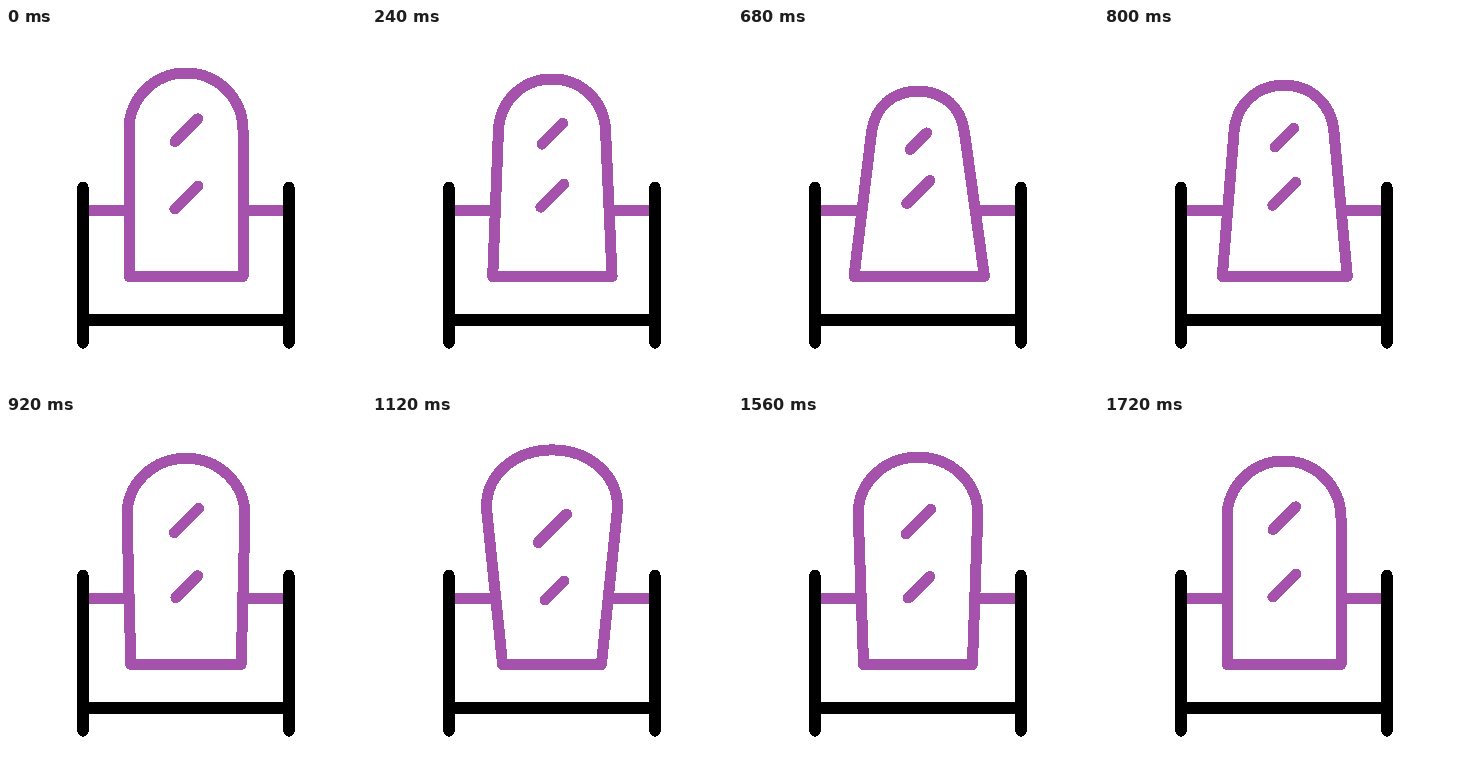
Write an HTML page that moves like this. It is 360x360 px and loops after 2000 ms.

```html
<!DOCTYPE html>
<html>
<head>
<meta charset="utf-8">
<style>
  html, body { margin: 0; width: 100%; height: 100%; overflow: hidden; background: #fff; }
  svg { display: block; width: 100vw; height: 100vh; shape-rendering: crispEdges; }
  path { fill: none; stroke-width: 11; stroke-linecap: round; stroke-linejoin: round; }
  .glass { stroke: #a452ac; }
  .stand { stroke: #000; stroke-width: 11.4; }
</style>
</head>
<body>
<svg viewBox="0 0 360 360">
  <path class="glass" d="M77 182.5H122M238 182.5H283"/>
  <path class="glass" id="mirror"/>
  <path class="stand" d="M77 159.5V315M283 159.5V315M77 292H283"/>
</svg>
<script>
const LOOP = 2000, STEP = 40, CENTER = 180, BASE = 248.5;

// tilt: 0 upright, 1 leaning forward, -1 leaning back
const moves = [
  { start: 120, end: 680, from: 0, to: 1, ease: [.25, .1, .25, 1] },
  { start: 680, end: 1240, from: 1, to: -1, ease: [.36, 0, .3, 1] },
  { start: 1240, end: 1720, from: -1, to: 0, ease: [.6, 0, .6, 1] },
];

const curve = (a, b, s) => 3 * a * s * (1 - s) ** 2 + 3 * b * s * s * (1 - s) + s ** 3;

function bezierEase([x1, y1, x2, y2], t) {
  let low = 0, high = 1;
  for (let i = 0; i < 24; i++) {
    const mid = (low + high) / 2;
    if (curve(x1, x2, mid) < t) low = mid; else high = mid;
  }
  return curve(y1, y2, low);
}

function tiltAt(time) {
  const move = moves.find(m => time >= m.start && time < m.end);
  if (!move) return 0;
  const { start, end, from, to, ease } = move;
  return from + (to - from) * bezierEase(ease, (time - start) / (end - start));
}

function frame(tilt) {
  const forward = Math.max(tilt, 0), back = Math.max(-tilt, 0);
  const foot = 57 + 8.2 * tilt;
  const shoulder = 57 - 10.5 * forward + 8.7 * back;
  const shoulderY = 102 + 2.5 * forward - 5.5 * back;
  const top = 45 + 18.3 * forward - 12 * back;
  const shift = 1.2 * forward;

  // The arch leaves each side along that side's own direction.
  const bend = .215 - .04 * tilt;
  const handle = shoulder + (shoulder - foot) * bend;
  const handleY = shoulderY + (shoulderY - BASE) * bend;
  const crown = .555 * shoulder;

  return `M${CENTER + shift - foot} ${BASE}L${CENTER - shoulder} ${shoulderY}` +
    `C${CENTER - handle} ${handleY} ${CENTER - crown} ${top} ${CENTER} ${top}` +
    `S${CENTER + handle} ${handleY} ${CENTER + shoulder} ${shoulderY}` +
    `L${CENTER + shift + foot} ${BASE}Z`;
}

const glint = (x, y, r) => `M${x - r} ${y + r}L${x + r} ${y - r}`;

function glints(tilt) {
  const back = Math.max(-tilt, 0);
  return glint(180.4, 102.2 + 11 * Math.abs(tilt), 11.4 - 3.1 * tilt) +
    glint(180.3 + 2.5 * back, 169.5 - 5.5 * tilt, 11.5 - 2.3 * back);
}

const mirror = document.getElementById('mirror');

function draw() {
  const time = Math.floor(performance.now() % LOOP / STEP) * STEP;
  const tilt = tiltAt(time);
  mirror.setAttribute('d', frame(tilt) + glints(tilt));
  requestAnimationFrame(draw);
}
draw();
</script>
</body>
</html>
```
